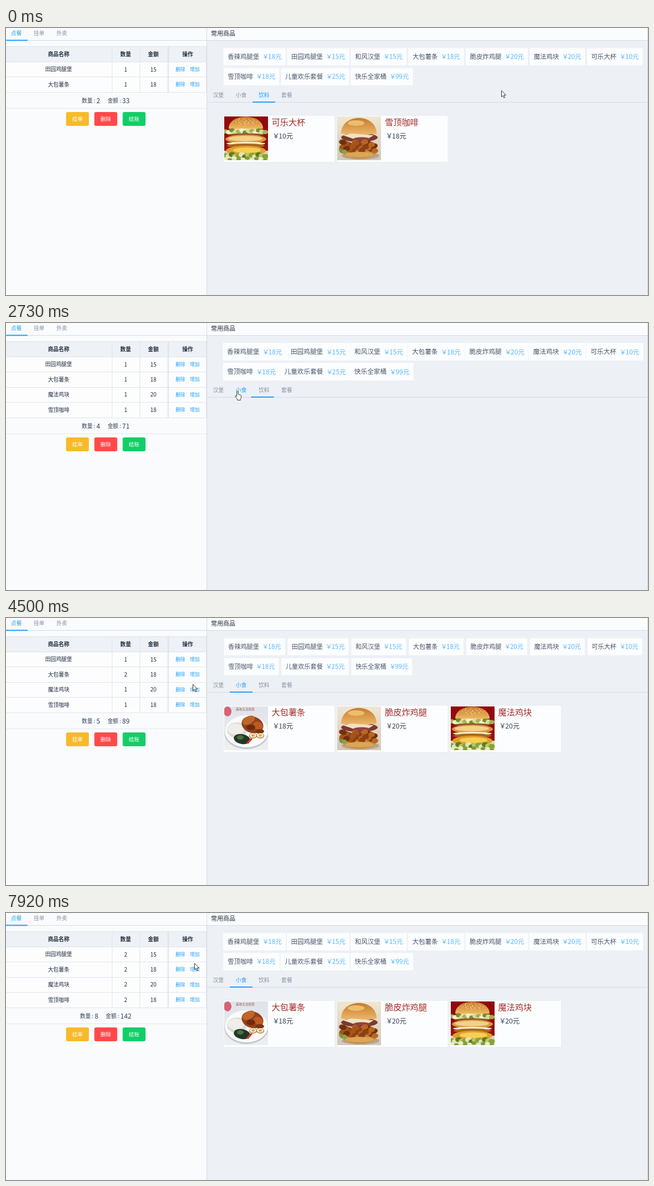
Animation, 1159 px wide and 483 px high, one loop 8000 ms. Source, as an HTML page with a canvas:

```html
<!DOCTYPE html>
<html lang="zh-CN">
<head>
<meta charset="utf-8">
<title>点餐</title>
<style>
html, body { margin: 0; width: 100%; height: 100%; overflow: hidden; background: #edf0f5; }
canvas { display: block; }
</style>
</head>
<body>
<canvas id="stage" width="1159" height="483"></canvas>
<script>
const ctx = document.getElementById('stage').getContext('2d');
const LOOP = 8000;
const FONT = '"Noto Sans CJK SC", "Noto Sans CJK", "Noto Sans SC", sans-serif';
const BLUE = '#20a0ff', INK = '#1f2d3d', LINE = '#d1dbe5', CELL = '#dfe6ec', GREY = '#8391a5';
const ROW_TOP = 61, ROW_H = 27.45;

const goods = [
  ['香辣鸡腿堡', 18], ['田园鸡腿堡', 15], ['和风汉堡', 15], ['大包薯条', 18], ['脆皮炸鸡腿', 20],
  ['魔法鸡块', 20], ['可乐大杯', 10], ['雪顶咖啡', 18], ['儿童欢乐套餐', 25], ['快乐全家桶', 99]
];
// name, price, time the row appears, time its count becomes 2
const order = [
  ['田园鸡腿堡', 15, 0, 7700], ['大包薯条', 18, 0, 4260],
  ['魔法鸡块', 20, 760, 6000], ['雪顶咖啡', 18, 1560, 6700]
];
const TAB_CLICK = 2715, CARDS_IN = 2780;
// seconds -> pulse cycles
const beats = [[0, -8.25], [1.62, -3.42], [2.73, 0], [3.54, 2.5], [5.58, 8.62], [6.9, 12.74], [7.92, 15.82], [8, 16.06]];
// time, x, y, hand
const path = [
  [0, 894, 113, 0], [200, 894, 113, 0], [500, 985, 48, 1], [850, 985, 48, 1], [1080, 820, 318, 0],
  [1250, 760, 288, 0], [1500, 653, 218, 1], [1700, 653, 218, 1], [2310, 500, 200, 0], [2600, 413, 123, 1],
  [2850, 413, 123, 1], [3200, 470, 300, 0], [3540, 505, 277, 0], [3700, 498, 315, 0], [4000, 400, 200, 0],
  [4150, 337, 107, 1], [4450, 337, 107, 1], [4800, 345, 325, 0], [5100, 345, 325, 0], [5400, 337, 135, 1],
  [6100, 337, 135, 1], [6500, 337, 160, 1], [7000, 337, 160, 1], [7550, 337, 80, 1], [7800, 337, 80, 1],
  [7900, 340, 91, 0], [8000, 340, 91, 0]
];

const clamp = v => Math.max(0, Math.min(1, v));
const mix = (a, b, k) => a + (b - a) * k;
const smooth = k => k * k * (3 - 2 * k);

function segment(keys, t) {
  let i = 0;
  while (i < keys.length - 2 && t >= keys[i + 1][0]) i++;
  const a = keys[i], b = keys[i + 1];
  return { a, b, k: clamp((t - a[0]) / (b[0] - a[0])) };
}

function rect(x, y, w, h, color) {
  ctx.fillStyle = color;
  ctx.fillRect(x, y, w, h);
}

function oval(x, y, rx, ry, color, turn = 0) {
  ctx.fillStyle = color;
  ctx.beginPath();
  ctx.ellipse(x, y, rx, ry, turn, 0, 7);
  ctx.fill();
}

function shape(points, color) {
  ctx.fillStyle = color;
  ctx.beginPath();
  points.forEach(([x, y]) => ctx.lineTo(x, y));
  ctx.closePath();
  ctx.fill();
}

// y is the vertical middle of the glyphs
function text(str, x, y, size, color, align = 'left', weight = 400) {
  ctx.font = `${weight} ${size}px ${FONT}`;
  ctx.textAlign = align;
  ctx.fillStyle = color;
  ctx.fillText(str, x, y + size * 0.38);
  return ctx.measureText(str).width;
}

// the currency sign sits close to the digits
function money(price, x, y, size, color) {
  text('￥', x + size * 0.1, y, size, color);
  text(`${price}元`, x + size, y, size, color);
}

function fade(top, bottom, y0, y1) {
  const g = ctx.createLinearGradient(0, y0, 0, y1);
  g.addColorStop(0, top);
  g.addColorStop(1, bottom);
  return g;
}

function frill(y, step, r, colors) {
  for (let x = 2, i = 0; x < 80; x += step, i++)
    oval(x, y + Math.sin(i * 2.3) * 2, r, r * 0.75, colors[i % colors.length]);
}

function bun(x, y, rx, h, top, bottom) {
  ctx.fillStyle = fade(top, bottom, y - h, y);
  ctx.beginPath();
  ctx.moveTo(x - rx, y);
  ctx.bezierCurveTo(x - rx, y - h * 1.3, x + rx, y - h * 1.3, x + rx, y);
  ctx.quadraticCurveTo(x, y + 5, x - rx, y);
  ctx.fill();
}

function seeds(x, y, rx, ry) {
  for (let i = 0; i < 22; i++) {
    const a = i * 2.4, r = Math.sqrt(i / 22);
    oval(x + Math.cos(a) * r * rx, y + Math.sin(a) * r * ry, 1, 0.7, '#f8e2ad');
  }
}

function stackBurger() {
  rect(0, 0, 79, 79, fade('#8f090c', '#9b1214', 0, 79));
  rect(0, 62, 79, 17, '#dcd6b4');
  bun(39, 22, 31, 22, '#c57a2a', '#efb85e');
  seeds(39, 9, 20, 6);
  oval(39, 28, 38, 6, '#efe6bd');
  frill(27, 6, 5, ['#a3b552', '#eef0c9', '#74902f', '#d5dc98']);
  oval(39, 33, 33, 2.5, '#97502a');
  oval(39, 41, 37, 8, '#d8993f');
  oval(38, 40, 31, 5, '#f2d18b');
  oval(39, 49, 35, 3, '#fbf0cb');
  oval(39, 53, 34, 4, '#a9671f');
  oval(39, 62, 36, 9, '#e0a02c');
  oval(41, 61, 25, 5, '#f7cf55');
  frill(71, 6, 6, ['#86a537', '#e2e6b4', '#587f26', '#b9c967']);
  frill(77, 8, 4, ['#f0eacb', '#7f9e38']);
}

function chickenBurger() {
  rect(0, 0, 79, 79, fade('#efe7d2', '#d3c7b8', 0, 79));
  oval(42, 71, 34, 7, '#b5a68f');
  oval(40, 65, 30, 11, '#c98a3a');
  oval(10, 59, 7, 8, '#7f8f3c');
  oval(40, 38, 33, 8, '#7d3a2c');
  bun(39, 31, 32, 29, '#c57a2c', '#e9b366');
  oval(34, 12, 15, 5, '#edbd6d');
  shape([[10, 34], [26, 31], [66, 34], [54, 41], [36, 43], [22, 38]], '#eee2c6');
  oval(44, 41, 15, 3.5, '#93403f');
  for (let i = 0; i < 30; i++)
    oval(9 + (i * 17) % 62, 46 + (i * 7) % 17, 6, 4.5, ['#8c4014', '#b96620', '#6f310d', '#a4531a'][i % 4]);
  oval(40, 69, 26, 5, '#dda557');
  oval(13, 64, 4, 4, '#8ea04a');
}

function ricePlate() {
  rect(0, 0, 79, 79, fade('#dfe3ea', '#eeeff1', 0, 79));
  oval(6, 9, 7, 9, '#d96075');
  text('美味无法抵挡', 21, 5, 5.6, '#96584d');
  oval(40, 47, 40, 30, '#c3c8d0');
  oval(40, 45, 39, 29, '#fafafa');
  oval(23, 43, 18, 14, '#dddbd6');
  oval(21, 41, 15, 10, '#f0eeea');
  oval(51, 33, 20, 15, '#93421c', 0.3);
  oval(44, 25, 12, 7, '#c0662c', -0.5);
  oval(61, 35, 9, 7, '#bd5a24', 0.5);
  oval(48, 38, 8, 5, '#6e2b10');
  oval(64, 45, 8, 4, '#7a3314');
  oval(32, 59, 15, 9, '#22382a', 0.2);
  oval(29, 56, 6, 4, '#4b713a');
  shape([[40, 66], [48, 57], [51, 59], [43, 68]], '#d2382b');
  for (const [x, y] of [[52, 53], [65, 53]]) {
    oval(x, y, 7, 5, '#a8703f');
    oval(x, y - 0.5, 6, 4, '#fff2d8');
    oval(x, y - 0.5, 3, 2.2, '#e6a63d');
  }
}

function drawOrder(t, hoverRow) {
  rect(0, 0, 362, 483, '#fafbfd');
  rect(0, 22, 362, 1, LINE);
  rect(0, 21.3, 39, 2, BLUE);
  ['点餐', '挂单', '外卖'].forEach((s, i) => text(s, 9 + i * 41, 9, 9.7, i ? GREY : BLUE));

  rect(0, 33, 362, 28, '#eef1f6');
  const rows = order.filter(r => t >= r[2]);
  const end = ROW_TOP + rows.length * ROW_H;
  const cols = [95, 216, 266, 328];
  ['商品名称', '数量', '金额', '操作'].forEach((s, i) => text(s, cols[i], 47, 9.7, INK, 'center', 700));

  let count = 0, total = 0;
  rows.forEach(([name, price, , plus], i) => {
    const n = t >= plus ? 2 : 1, top = ROW_TOP + i * ROW_H, y = top + 13.7;
    count += n;
    total += n * price;
    rect(0, top, 362, ROW_H, i === hoverRow ? '#eef1f6' : '#fdfdfe');
    text(name, cols[0], y, 9.7, INK, 'center');
    text(n, cols[1], y, 10, INK, 'center');
    text(price, cols[2], y, 10, INK, 'center');
    text('删除', 306, y, 8.8, BLUE);
    text('增加', 332, y, 8.8, BLUE);
  });
  rect(0, 33, 362, 1, CELL);
  for (let i = 0; i <= rows.length; i++) rect(0, Math.round(ROW_TOP + i * ROW_H), 362, 1, CELL);
  for (const x of [191, 241, 291, 293]) rect(x, 33, 1, end - 33, x === 293 ? LINE : CELL);
  rect(361, 33, 1, end - 33, CELL);

  const parts = [['数量 : ', 9.7, 0], [count, 12, 0], ['金额 : ', 9.7, 13.5], [total, 12, 0]];
  const width = parts.reduce((sum, [s, size, gap]) => {
    ctx.font = `400 ${size}px ${FONT}`;
    return sum + gap + ctx.measureText(s).width;
  }, 0);
  let x = 180 - width / 2;
  for (const [s, size, gap] of parts) x += gap + text(s, x + gap, end + 15.5, size, '#324057');
  rect(0, Math.round(end + 29), 362, 1, '#e2e8ef');

  ['挂单', '删除', '结账'].forEach((s, i) => {
    const left = 108.4 + i * 51.1;
    ctx.fillStyle = ['#f7ba2a', '#ff4949', '#13ce66'][i];
    ctx.beginPath();
    ctx.roundRect(left, end + 36.2, 41.3, 25, 3);
    ctx.fill();
    text(s, left + 20.6, end + 48.5, 9.6, '#fff', 'center');
  });
}

function drawChips(scale) {
  let x = 394, y = 52;
  goods.forEach(([name, price], i) => {
    if (i === 7) { x = 394; y = 88; }
    const w = 53.7 + 11.1 * name.length;
    ctx.save();
    ctx.translate(x + w / 2, y);
    ctx.scale(scale, scale);
    rect(-w / 2, -15.2, w, 30.4, '#fcfdfe');
    text(name, 7.4 - w / 2, 0, 11.1, '#475669');
    money(price, w / 2 - 42, 0, 11.3, '#58b7ff');
    ctx.restore();
    x += w + 5.7;
  });
}

function drawCard(i, name, price, picture) {
  const x = 393 + i * 204.5;
  rect(x - 0.5, 157.5, 201, 86, '#e6eaf0');
  rect(x, 158.5, 200, 84, '#fcfdfe');
  ctx.save();
  ctx.translate(Math.round(x + 0.9), 160);
  ctx.beginPath();
  ctx.rect(0, 0, 79, 79);
  ctx.clip();
  picture();
  ctx.restore();
  text(name, x + 86.5, 170.5, 15.2, '#a52a2a');
  money(price, x + 87, 195, 12.3, '#324057');
}

function drawMenu(t, hoverTab) {
  rect(362, 0, 797, 483, '#edf0f5');
  rect(363, 0, 796, 22, '#fafcfd');
  rect(363, 22, 796, 1, LINE);
  text('常用商品', 370, 9.5, 11, INK);

  const { a, b, k } = segment(beats, t / 1000);
  const beat = mix(a[1], b[1], k);
  drawChips(1 + 0.025 * (1 + Math.cos(beat * Math.PI * 2)));

  rect(363, 134, 796, 1, LINE);
  const switched = t >= TAB_CLICK;
  const slide = smooth(clamp((t - TAB_CLICK) / 110));
  rect(mix(445, 404, slide), 133, 41, 2, BLUE);
  ['汉堡', '小食', '饮料', '套餐'].forEach((s, i) => {
    const on = i === (switched ? 1 : 2) || (i === 1 && hoverTab);
    text(s, 373.5 + i * 41.2, 121, 9.8, on ? BLUE : GREY);
  });

  ctx.save();
  if (!switched) {
    drawCard(0, '可乐大杯', 10, stackBurger);
    drawCard(1, '雪顶咖啡', 18, chickenBurger);
  } else if (t > CARDS_IN) {
    const left = Math.pow(1 - clamp((t - CARDS_IN) / 950), 2.2);
    ctx.globalAlpha = 1 - left;
    ctx.translate(0, 84 * left);
    drawCard(0, '大包薯条', 18, ricePlate);
    drawCard(1, '脆皮炸鸡腿', 20, chickenBurger);
    drawCard(2, '魔法鸡块', 20, stackBurger);
  }
  ctx.restore();
  rect(362, 0, 1, 483, LINE);
  rect(1158, 0, 1, 483, '#c6d0db');
}

function pointer(t) {
  const { a, b, k } = segment(path, t);
  const e = smooth(k);
  const hand = a[3] && b[3] || a[3] && k < 0.1 || b[3] && k > 0.85;
  return { x: mix(a[1], b[1], e), y: mix(a[2], b[2], e), hand };
}

const arrow = new Path2D('M0.5 0V11.6L3 9.2L4.9 13.4L6.7 12.6L4.9 8.4H8.5Z');
const hand = new Path2D('M3.5 10V2Q3.5 0.5 4.7 0.5Q5.9 0.5 5.9 2V6.2Q7.8 5.6 8.1 6.8Q9.7 6.3 10 7.5' +
  'Q11.5 7.3 11.5 8.8V11.5Q11.5 13.5 10.3 14.6V16.5H4.6V15L1 10.4Q0 8.9 1.2 8.4Q2.2 8.2 3.5 10Z');

function drawPointer(p) {
  ctx.save();
  ctx.translate(Math.round(p.x), Math.round(p.y));
  const icon = p.hand ? hand : arrow;
  ctx.fillStyle = '#fff';
  ctx.strokeStyle = '#222';
  ctx.lineWidth = 0.9;
  ctx.fill(icon);
  ctx.stroke(icon);
  ctx.restore();
}

function draw(t) {
  const p = pointer(t);
  const hoverRow = p.hand && p.x < 362 ? Math.floor((p.y - ROW_TOP) / ROW_H) : -1;
  const hoverTab = p.hand && p.y > 110 && p.y < 134 && p.x > 404 && p.x < 445;
  drawMenu(t, hoverTab);
  drawOrder(t, hoverRow);
  drawPointer(p);
}

function tick() {
  draw(performance.now() % LOOP);
  requestAnimationFrame(tick);
}
tick();
</script>
</body>
</html>
```
